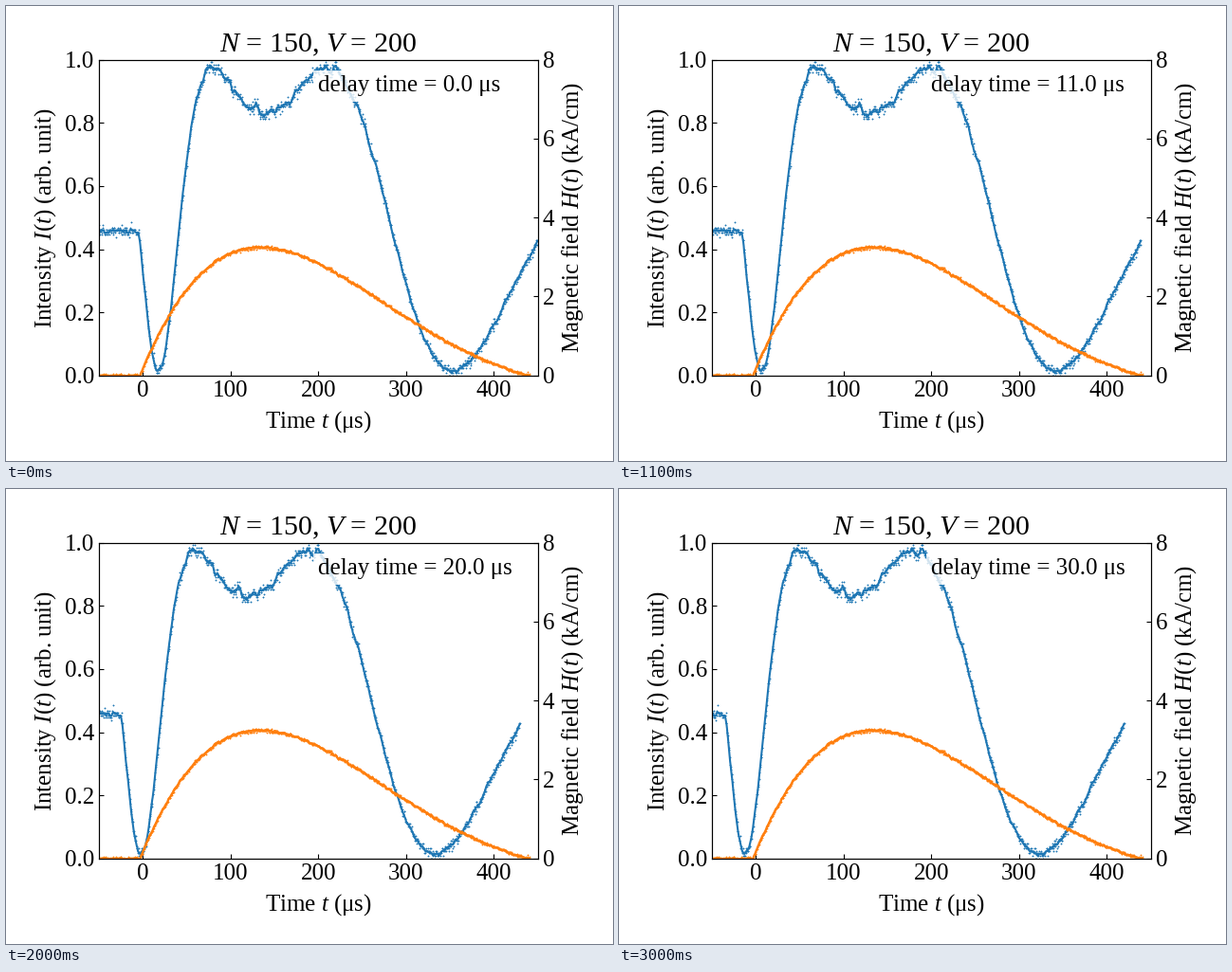
A matplotlib script for the animation above (3100 ms loop, 640 by 480 pixels).

```python
import numpy as np
import matplotlib.pyplot as plt
from matplotlib.animation import FuncAnimation

W, H, DPI = 640, 480, 100
FRAMES, INTERVAL = 31, 100
LEFT, RIGHT, TOP, BOTTOM = 98.2, 560.75, 56.7, 389.7
BLUE, ORANGE = "tab:blue", "tab:orange"

plt.rcParams.update({
    "font.family": "Liberation Serif",
    "font.size": 18,
    "mathtext.fontset": "custom",
    "mathtext.rm": "Liberation Serif",
    "mathtext.it": "Liberation Serif:italic",
    "xtick.direction": "in",
    "ytick.direction": "in",
})

rng = np.random.default_rng(12)


def smooth(y, n):
    """Moving average that keeps the ends level."""
    padded = np.pad(y, n // 2, mode="edge")
    return np.convolve(padded, np.ones(n) / n, mode="valid")


def quantize(y, step):
    return np.round(y / step) * step


def pulse(tau, peak, end):
    """Damped sine from 0 up to 1 at peak and back to 0 at end."""
    w = np.pi / end
    a = w / np.tan(w * peak)
    return np.exp(a * (peak - tau)) * np.sin(w * tau) / np.sin(w * peak)


def intensity(t):
    """Light through a polarizer whose angle trails the field pulse."""
    since = np.maximum(t + 5, 0)
    tau = since - 5.5 * (1 - np.exp(-since / 12))
    angle = np.radians(155.5 * pulse(tau, 137, 456) - 42.8)
    bump = 0.032 * np.exp(-((t - 127.5) / 2.8) ** 2)
    return 0.014 + 0.957 * np.sin(angle) ** 2 + bump


def field(t):
    return 3.25 * pulse(np.maximum(t + 3.5, 0), 137.5, 441)


t = np.arange(-55, 450, 0.5)
base = intensity(t)
drift = smooth(rng.normal(0, 1, t.size), 9) * 0.022 * base ** 2
noise = rng.normal(0, 1, t.size) * (0.007 + 0.002 * base)
raw_i = quantize(base + drift + noise, 1 / 128)
line_i = smooth(raw_i, 7)
raw_h = quantize(field(t) + rng.normal(0, 0.02, t.size), 0.04)
line_h = smooth(raw_h, 5)

fig = plt.figure(figsize=(W / DPI, H / DPI), dpi=DPI, facecolor="white")
ax = fig.add_axes([LEFT / W, 1 - BOTTOM / H,
                   (RIGHT - LEFT) / W, (BOTTOM - TOP) / H])
ax2 = ax.twinx()
ax.set(xlim=(-50, 450), ylim=(0, 1), xticks=range(0, 401, 100))
ax2.set(ylim=(0, 8), yticks=range(0, 9, 2))
ax.set_title("$N$ = 150, $V$ = 200")


def axis_label(x, y, s, rotation=0):
    fig.text(x / W, 1 - y / H, s, rotation=rotation, ha="center",
             va="baseline", rotation_mode="anchor")


mid_x, mid_y = (LEFT + RIGHT) / 2, (TOP + BOTTOM) / 2
axis_label(mid_x, 445, "Time $t$ (μs)")
axis_label(47.2, mid_y, "Intensity $I(t)$ (arb. unit)", 90)
axis_label(603.5, mid_y, "Magnetic field $H(t)$ (kA/cm)", 90)

dot_style = dict(ls="none", marker="+", ms=1.9, mew=0.6)
dots, = ax.plot(t, raw_i, color=BLUE, **dot_style)
curve, = ax.plot(t, line_i, color=BLUE, lw=1.5)
ax2.plot(t, raw_h, color=ORANGE, **dot_style)
ax2.plot(t, line_h, color=ORANGE, lw=1.7)

label = ax.text(200, 0.9, "", zorder=5,
                bbox=dict(facecolor="white", edgecolor="none", alpha=0.8))


def update(delay):
    dots.set_xdata(t - delay)
    curve.set_xdata(t - delay)
    label.set_text(f"delay time = {delay:.1f} μs")
    return dots, curve, label


anim = FuncAnimation(fig, update, frames=FRAMES, interval=INTERVAL,
                     repeat=True, repeat_delay=0)
plt.show()
```
